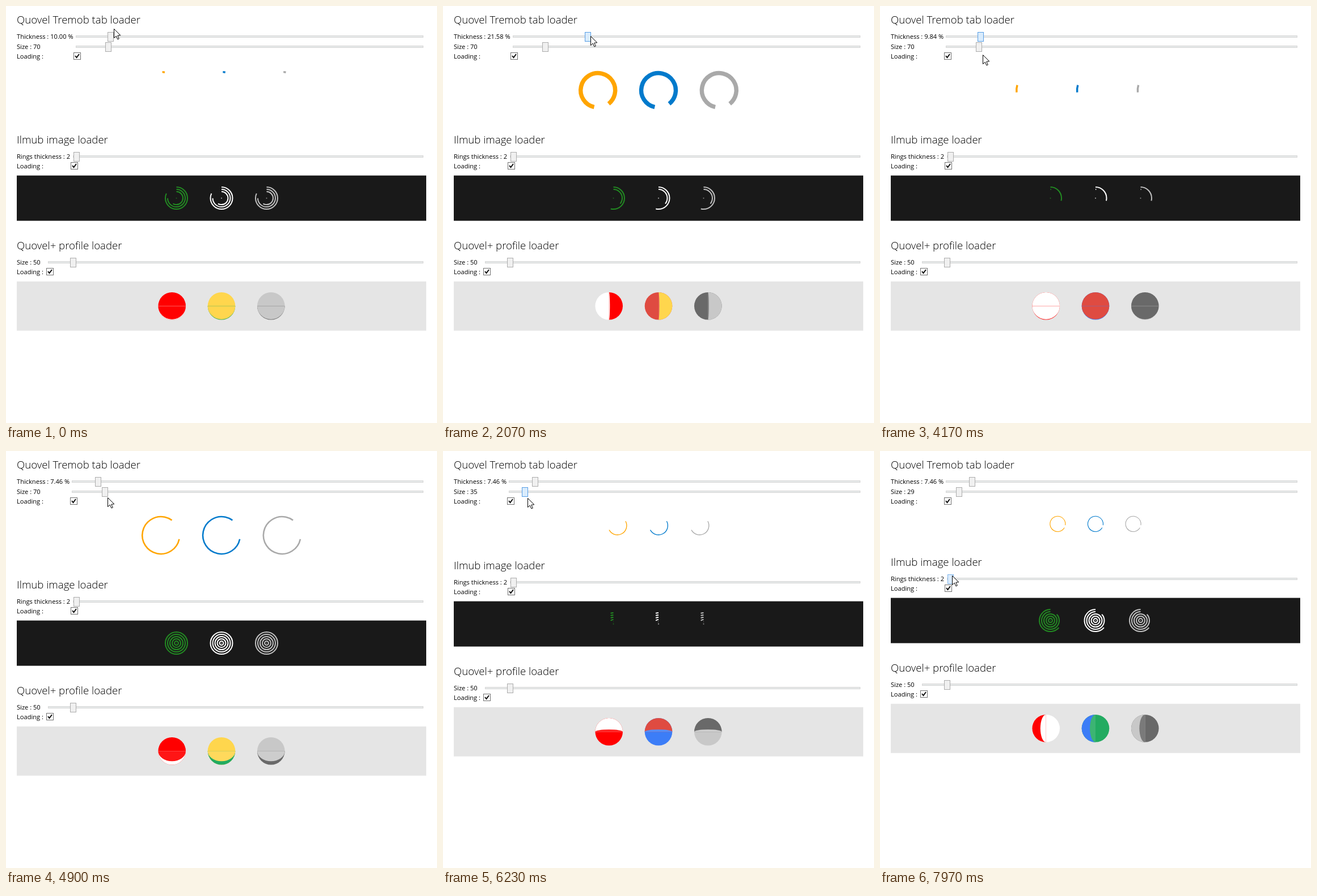
Recreate the animation shown at these times as an HTML page with a canvas. Size 760 by 737 pixels, loop 8 s.

```html
<!DOCTYPE html>
<html lang="en">
<head>
<meta charset="utf-8">
<title>Loaders</title>
<style>
  html, body { margin: 0; width: 100%; height: 100%; overflow: hidden; background: #fff; }
  canvas { display: block; }
</style>
</head>
<body>
<canvas id="stage" width="760" height="737"></canvas>
<script>
const ctx = document.getElementById('stage').getContext('2d');
const LOOP = 8000;
const CENTER = 380;
const RIGHT = 736;
const TAU = Math.PI * 2;

// Way points: [time, value] and [time, x, y]
const THICKNESS = [[830, 10], [2070, 21.56], [2650, 32], [3270, 24.41], [4170, 9.84], [4650, 7.46]];
const POINTER = [[0, 190, 40], [830, 188, 52], [2070, 260, 53], [2650, 326, 65], [3270, 252, 79],
  [4170, 181, 86], [5630, 178, 78], [6230, 149, 83], [7970, 127, 220]];

const clamp = x => Math.min(1, Math.max(0, x));
const within = (t, from, to) => t >= from && t < to;

function follow(points, t, col = 1) {
  const next = points.findIndex(p => p[0] > t);
  if (next < 0) return points[points.length - 1][col];
  if (next === 0) return points[0][col];
  const a = points[next - 1], b = points[next];
  return a[col] + (b[col] - a[col]) * (t - a[0]) / (b[0] - a[0]);
}

// Dragged quickly at first, then slowing down
const sizeAt = t => 29.4 + 40.2 * (1 - clamp((t - 5640) / 1250)) ** 3;

function box(x, y, w, h, fill, edge) {
  ctx.fillStyle = edge;
  ctx.fillRect(x, y, w, h);
  ctx.fillStyle = fill;
  ctx.fillRect(x + 1, y + 1, w - 2, h - 2);
}

function write(text, y, font) {
  ctx.font = font;
  ctx.fillStyle = '#000';
  ctx.fillText(text, 19, y);
}
const heading = (text, y) => write(text, y, "300 18.6px 'Open Sans', sans-serif");
const label = (text, y) => write(text, y, "11.1px 'Open Sans', sans-serif");

const THUMB = {
  idle: ['#f0f0f0', '#acacac'],
  hover: ['#dcecfc', '#7eb4ea'],
  drag: ['#daecfc', '#569de5']
};

function slider(left, y, thumb, mouse, dragged = false) {
  const x = Math.round(thumb - 5.5);
  const over = within(mouse.x, x, x + 11) && within(mouse.y, y - 8, y + 9);
  const state = dragged ? 'drag' : over ? 'hover' : 'idle';
  box(left, y - 2, RIGHT - left, 4, '#e7eaea', '#d6d6d6');
  box(x, y - 8, 11, 17, ...THUMB[state]);
}

function checkbox(x, y) {
  box(x, y, 13, 13, '#fff', '#707070');
  ctx.strokeStyle = '#111';
  ctx.lineWidth = 2;
  ctx.beginPath();
  ctx.moveTo(x + 3, y + 6);
  ctx.lineTo(x + 5.5, y + 9.2);
  ctx.lineTo(x + 10, y + 3);
  ctx.stroke();
}

function panel(y, h, color) {
  ctx.fillStyle = color;
  ctx.fillRect(19, y, 722, h);
}

// Angles in degrees, clockwise from the top
function arc(x, y, r, width, from, to, color) {
  if (to - from < 0.5) return;
  const rad = d => (d - 90) * Math.PI / 180;
  ctx.strokeStyle = color;
  ctx.lineWidth = width;
  ctx.beginPath();
  ctx.arc(x, y, r, rad(from), rad(to));
  ctx.stroke();
}

function tabLoaders(t, size, thickness) {
  const period = 1498, grow = 520, least = 7;
  const local = t % period;
  const turn = 4 + 360 * t / period;
  let from = turn, to = turn + 360;
  if (local < grow) {
    to = turn + 360 - (360 - least) * (1 - local / grow) ** 1.1;
  } else {
    from = to - least - (360 - least) * (1 - (local - grow) / (period - grow)) ** 2.8;
  }
  const r = size / 2 - 0.6;
  const width = size / 2 * thickness / 100;
  ['#ffa500', '#007acc', '#a9a9a9'].forEach((color, i) =>
    arc(CENTER + (i - 1) * (size + 37.2), 114.2 + size / 2, r - width / 2, width, from, to, color));
}

function ringLoaders(t, y) {
  const period = 2350, unwindAt = 1370;
  const local = (t + 818) % period;
  const wind = local / 1000;
  const unwind = (local - unwindAt) / (period - unwindAt);
  ['#228b22', '#ffffff', '#c0c0c0'].forEach((color, n) => {
    const x = CENTER + (n - 1) * 79.5;
    for (let i = 0; i < 5; i++) {
      const r = 19.5 - 4 * i;
      const start = Math.min(0.28 * i, 0.94);
      const part = p => clamp((p - start) / (1 - start));
      const stub = i < 4 ? 280 / r : 0;
      arc(x, y, r, 2, part(unwind) * (360 - stub), part(wind) * 360, color);
    }
    ctx.globalAlpha = 0.8;
    ctx.fillStyle = color;
    ctx.fillRect(x - 0.8, y - 0.8, 1.6, 1.6);
    ctx.globalAlpha = 1;
  });
}

function halfDisc(width, r, side, color) {
  ctx.fillStyle = color;
  ctx.beginPath();
  ctx.ellipse(0, 0, width, r, 0, -Math.PI / 2, Math.PI / 2, side < 0);
  ctx.fill();
}

function foldingDisc(x, y, r, colors, phase) {
  const step = Math.floor(phase);
  const p = phase - step;
  const old = colors[step % 4], fresh = colors[(step + 1) % 4];
  const fold = Math.cos(Math.PI * p);
  const side = fold > 0 ? 1 : -1;
  const width = Math.abs(fold) * (r - 0.8);
  ctx.save();
  ctx.translate(x, y);
  ctx.rotate((step + 1) * Math.PI / 2);
  ctx.fillStyle = old;
  ctx.beginPath();
  ctx.arc(0, 0, r, 0, TAU);
  ctx.fill();
  halfDisc(r, r, 1, fresh);
  halfDisc(width, r, side, fold > 0 ? old : fresh);
  halfDisc(width, r, side, `rgba(255,255,255,${0.13 * Math.sin(Math.PI * p)})`);
  // Hairline along the crease while the flap lies flat
  ctx.globalAlpha = 0.2 * fold ** 8;
  ctx.fillStyle = fold > 0 ? fresh : old;
  ctx.fillRect(-0.5, -r, 1, 2 * r);
  ctx.restore();
}

function profileLoaders(t, y) {
  const phase = t / 597 + 0.01;
  const sets = [
    ['#ff0000', '#ffffff', '#ff0000', '#ffffff'],
    ['#ffd64d', '#22ab61', '#3c7df7', '#df4b41'],
    ['#c8c8c8', '#696969', '#c8c8c8', '#696969']
  ];
  sets.forEach((colors, i) => foldingDisc(CENTER + (i - 1) * 87.3, y, 24.3, colors, phase));
}

function drawPointer({ x, y }) {
  const shape = [[0, 0], [0, 16], [3.8, 12.6], [6.4, 18.4], [8.8, 17.4], [6.3, 11.7], [11.3, 11.3]];
  ctx.beginPath();
  shape.forEach(([dx, dy]) => ctx.lineTo(x + 0.5 + dx, y + 0.5 + dy));
  ctx.closePath();
  ctx.fillStyle = '#fff';
  ctx.fill();
  ctx.strokeStyle = '#000';
  ctx.lineWidth = 1;
  ctx.stroke();
}

function draw(t) {
  const thickness = follow(THICKNESS, t);
  const size = sizeAt(t);
  const up = Math.round(69.6 - size);
  const left = thickness < 10 ? 116 : 123;
  const span = 726 - left;
  const mouse = { x: Math.round(follow(POINTER, t, 1)), y: Math.round(follow(POINTER, t, 2)) };
  const lower = { x: mouse.x, y: mouse.y + up };

  ctx.fillStyle = '#fff';
  ctx.fillRect(0, 0, 760, 737);

  heading('Quovel Tremob tab loader', 31);
  label(`Thickness : ${thickness.toFixed(2)} %`, 58);
  slider(left, 54, left + 7 + (thickness - 1) * span / 99, mouse, within(t, 830, 4800));
  label(`Size : ${Math.round(size)}`, 76);
  slider(left, 72, left + 7 + (size - 10) * span / 710, mouse, within(t, 5640, 6650));
  label('Loading :', 93);
  checkbox(left < 120 ? 113 : 119, 82);
  tabLoaders(t, size, thickness);

  // Everything below moves up as the first loaders shrink
  ctx.save();
  ctx.translate(0, -up);
  heading('Ilmub image loader', 243);
  label('Rings thickness : 2', 270);
  slider(118, 266, 124.5, lower);
  label('Loading :', 287);
  checkbox(114, 276);
  panel(299.6, 80, '#191919');
  ringLoaders(t, 339.6);

  heading('Quovel+ profile loader', 430);
  label('Size : 50', 457);
  slider(74, 453, 118.5, lower);
  label('Loading :', 474);
  checkbox(71, 463);
  panel(486.8, 87, '#e5e5e5');
  profileLoaders(t, 530.2);
  ctx.restore();

  drawPointer(mouse);
}

function frame() {
  draw(performance.now() % LOOP);
  requestAnimationFrame(frame);
}
frame();
</script>
</body>
</html>
```
